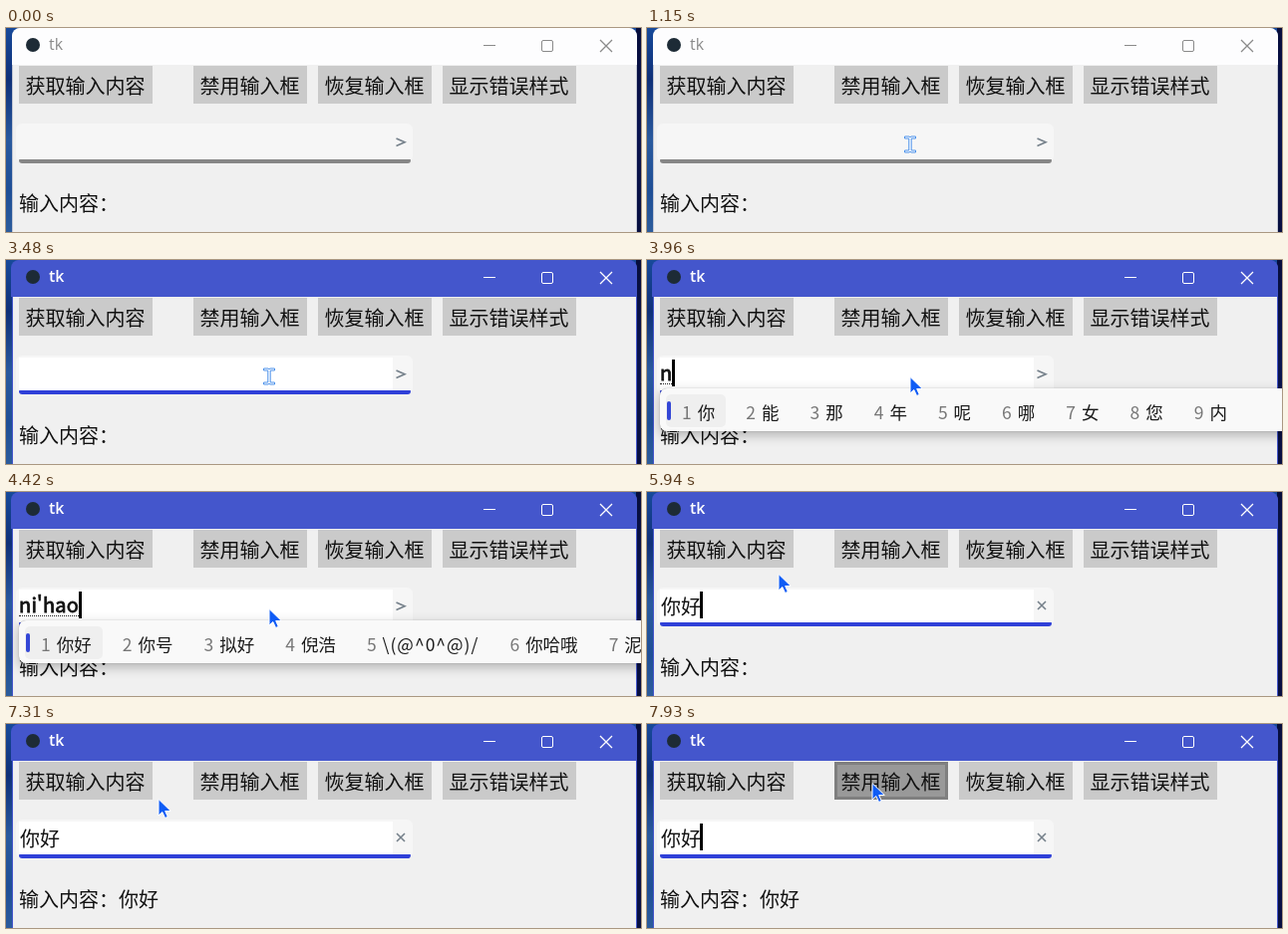
Write an HTML page that moves like this. It is 637 px wide and 205 px high and loops after 8000 ms.

```html
<!DOCTYPE html>
<html lang="zh-CN">
<head>
<meta charset="utf-8">
<title>tk</title>
<style>
  html, body { margin: 0; width: 100%; height: 100%; overflow: hidden; }
  body {
    position: relative;
    background: linear-gradient(#174a9a, #0f3078 25%, #2a5a9e 55%, #1f4f96 80%, #2c5c9c);
    font: 20px/40px "Noto Sans CJK SC", "Noto Sans CJK", sans-serif;
    color: #111;
  }
  div, span, svg { position: absolute; box-sizing: border-box; white-space: pre; }
  #desk { left: 632px; top: 0; width: 5px; height: 205px; background: linear-gradient(#060d3c, #0a1450 50%, #070f40); }
  #win { left: 6px; top: 0; width: 627px; height: 215px; border: 1px solid #c4c8d4; border-radius: 9px 9px 0 0; background: #f0f0f0; }
  #bar { left: 6px; top: 0; width: 627px; height: 37px; border-radius: 8px 8px 0 0; background: #fdfdfe; color: #8a8a8a; }
  .active #win { border-color: #4456cc; }
  .active #bar { left: 5px; width: 628px; background: #4456cc; color: #fff; }
  #logo { left: 20px; top: 10px; width: 14px; height: 14px; border-radius: 50%; background: #1d2b36; }
  #name { left: 43px; top: 0; font: 16px/33px "Open Sans", "Noto Sans", sans-serif; color: #8a8a8a; }
  .active #name { font-weight: 600; color: #fff; }
  #ctl { left: 0; top: 0; fill: none; stroke: #8a8a8a; }
  .active #ctl { stroke: #fff; }
  .btn { top: 38px; height: 38px; background: #cacaca; text-align: center; text-indent: -1px; }
  .btn.hover { background: #999; }
  .btn.ring { box-shadow: inset 0 0 0 3px #7f7f7f; }
  #entry { left: 10px; top: 96px; width: 398px; height: 39px; border-radius: 6px; background: #f6f6f6; }
  #field { left: 13px; top: 98px; width: 375px; height: 33px; }
  #line { left: 13px; top: 132px; width: 393px; height: 4px; border-radius: 1px 1px 4px 4px; background: #868686; }
  .focus #field { background: #fff; }
  .focus #line { background: #2f40d8; top: 131px; }
  #typed { left: 1px; top: -3px; }
  #typed.pre { left: 0; top: -5px; letter-spacing: .2px; -webkit-text-stroke: .8px #111; }
  #typed.pre::after { content: ""; position: absolute; left: 0; right: 0; top: 31px; border-bottom: 1px dotted #222; }
  #caret { top: 2px; width: 2.6px; height: 27px; background: #000; }
  #icon { left: 388px; top: 106px; fill: none; stroke: #75808a; stroke-width: 1.6; }
  #out { left: 13px; top: 156px; }
  #ime { left: 13px; top: 129px; width: 700px; height: 43px; border-radius: 7px; background: #f9f9f9; box-shadow: 0 4px 12px #0004, 0 0 1px #0006; }
  #pick { left: 6px; top: 6px; height: 33px; border-radius: 5px; background: #efefef; }
  #mark { left: 7px; top: 13px; width: 4px; height: 19px; border-radius: 2px; background: #3447d6; }
  #list { left: 22px; top: 0; display: flex; gap: 31px; font-size: 17.5px; line-height: 47px; color: #1a1a1a; }
  #list span { position: static; }
  #list i { font-style: normal; color: #777; margin-right: 6px; }
  #list .face { letter-spacing: 1px; }
  #list .face i { letter-spacing: 0; }
  #mouse { left: 0; top: 0; width: 1px; height: 1px; overflow: visible; }
</style>
</head>
<body>
<div id="desk"></div>
<div id="win"></div>
<div id="bar"></div>
<div id="logo"></div>
<span id="name">tk</span>
<svg id="ctl" width="637" height="37">
  <path d="M479 17.5h12"/>
  <path d="M596 12l12 12M608 12l-12 12" stroke-width="1.3"/>
  <rect x="537.5" y="12.5" width="11" height="11" rx="1.5"/>
</svg>
<div class="btn" style="left:13px;width:134px">获取输入内容</div>
<div class="btn" style="left:188px;width:114px">禁用输入框</div>
<div class="btn" style="left:313px;width:114px">恢复输入框</div>
<div class="btn" style="left:438px;width:134px">显示错误样式</div>
<div id="entry"></div>
<div id="line"></div>
<div id="field"><span id="typed"></span><div id="caret"></div></div>
<svg id="icon" width="18" height="18"><path id="glyph"/></svg>
<span id="out"></span>
<div id="ime"><div id="pick"></div><div id="mark"></div><div id="list"></div></div>
<svg id="mouse">
  <path id="arrow" d="M0 .5V17L3.8 13.500 6.600 19.500 9.300 18.300 6.700 12.500H12.300Z" fill="#0f5cf5" stroke="#fff"/>
  <path id="beam" d="M-5.500 -8H-1L0 -7.200 1 -8H5.500V-6H1.200V6H5.500V8H1L0 7.200 -1 8H-5.500V6H-1.200V-6H-5.500Z" fill="#fff" stroke="#4a90ea"/>
  <circle id="halo" cx="-1" cy="-1" r="15" fill="#fbf24a" opacity=".72"/>
</svg>
<script>
const LOOP = 8000, STEP = 70;
const $ = id => document.getElementById(id);
const buttons = [...document.querySelectorAll('.btn')].map(el => ({ el, x: el.offsetLeft, w: el.offsetWidth }));

const smooth = u => u * u * (3 - 2 * u);
const out = p => u => 1 - (1 - u) ** p;

// start time, steps, from, to, easing per axis
const moves = [
  { t: 730, n: 7, a: [283, 203], b: [264, 117], ex: smooth, ey: smooth },
  { t: 5800, n: 7, a: [264, 117], b: [101, 57], ex: out(2.96), ey: out(1.55) },
  { t: 7030, n: 8, a: [101, 57], b: [177, 83], ex: smooth, ey: smooth },
  { t: 7720, n: 4, a: [177, 83], b: [226, 59], ex: smooth, ey: smooth }
];
const carets = [[2030, 2620], [2890, 3480], [3810, 5340], [5600, 6200], [6500, 7100], [7400, 8000]];
const typing = [
  [3900, 'n', '你 能 那 年 呢 哪 女 您 内'],
  [3990, 'ni', '你 呢 泥 尼 拟 妮 逆 腻 倪'],
  [4070, "ni'h", '你好 你会 你和 你还 你很 你号 泥'],
  [4250, "ni'ha", '你哈 你好 你还 拟好 你行 你号 泥'],
  [4420, "ni'hao", '你好 你号 拟好 倪浩 \\(@^0^@)/ 你哈哦 泥嚎'],
  [4880, '你好', '']
];

const within = (t, a, b) => t >= a && t < b;
const show = (id, on) => $(id).style.visibility = on ? 'visible' : 'hidden';

function pointer(t) {
  const m = moves.filter(m => t >= m.t).pop();
  if (!m) return null;
  const u = Math.min(m.n, Math.floor((t - m.t) / STEP) + 1) / m.n;
  const mix = (i, e) => m.a[i] + (m.b[i] - m.a[i]) * e(u);
  return [mix(0, m.ex), mix(1, m.ey)];
}

let lastList = null;
function fillList(words) {
  if (words === lastList) return;
  lastList = words;
  const items = words.split(' ');
  $('list').innerHTML = items.map((w, i) =>
    `<span${w.includes('@') ? ' class="face"' : ''}><i>${i + 1}</i>${w}</span>`).join('');
  $('pick').style.width = 42 + 18 * items[0].length + 'px';
}

function render(t) {
  document.body.className = (t >= 1960 ? 'active ' : '') + (t >= 2030 ? 'focus' : '');

  const [, text, words] = typing.filter(k => t >= k[0]).pop() || [0, '', ''];
  const done = t >= 4880;
  $('typed').textContent = text;
  $('typed').className = words ? 'pre' : '';
  $('caret').style.left = Math.round($('typed').offsetWidth) + 'px';
  show('caret', carets.some(c => within(t, ...c)));
  show('ime', words);
  if (words) fillList(words);
  $('glyph').setAttribute('d', done ? 'M4 4l8 8M12 4l-8 8' : 'M3.5 5l8.500 3.700l-8.500 3.700');
  $('out').textContent = '输入内容：' + (t >= 6620 ? '你好' : '');

  const p = pointer(t);
  show('mouse', p);
  const [x, y] = p || [-99, -99];
  const beam = p && !words && within(x, 13, 388) && within(y, 98, 131);
  $('mouse').style.transform = `translate(${Math.round(x)}px,${Math.round(y)}px)`;
  $('arrow').style.display = beam ? 'none' : '';
  $('beam').style.display = beam ? '' : 'none';
  $('halo').style.display = within(t, 1960, 2090) || within(t, 6500, 6620) ? '' : 'none';

  buttons.forEach(({ el, x: bx, w }, i) => {
    const over = within(x, bx, bx + w) && within(y, 38, 76);
    el.classList.toggle('hover', over);
    el.classList.toggle('ring', over && !(i === 0 && t >= 6500));
  });
}

const start = performance.now();
function tick() {
  render((performance.now() - start) % LOOP);
  requestAnimationFrame(tick);
}
tick();
</script>
</body>
</html>
```
